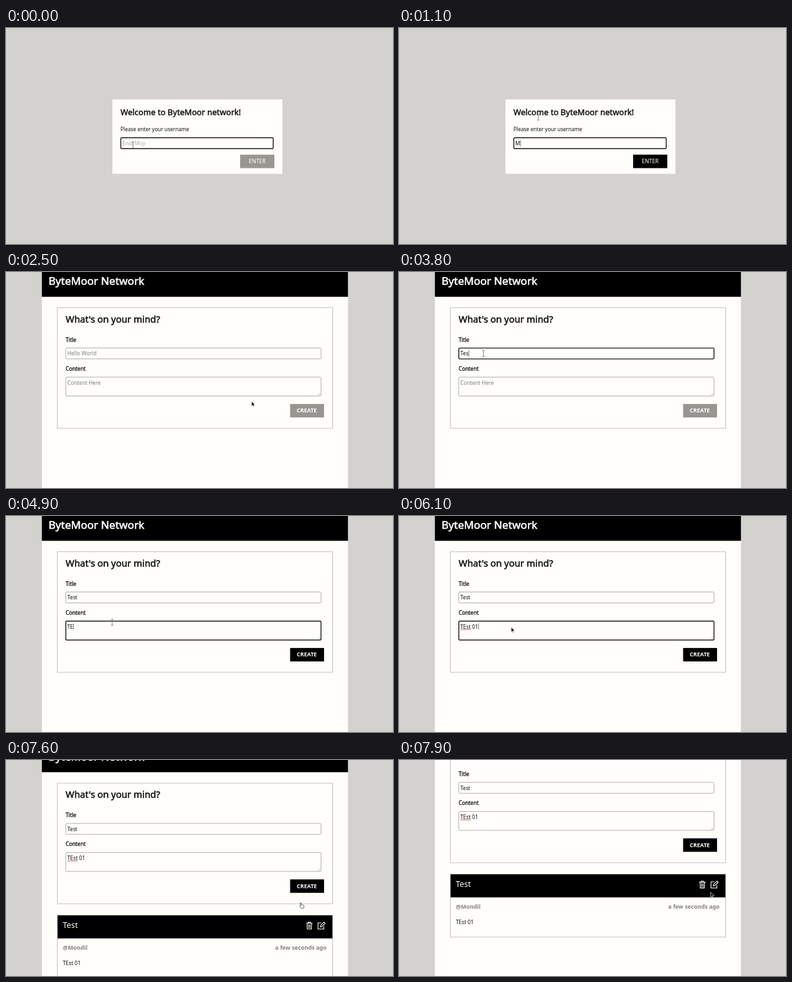
Write an HTML page that moves like this. It is 600 px wide and 337 px high and loops after 8 s.

```html
<!DOCTYPE html>
<html lang="en">
<head>
<meta charset="utf-8">
<title>ByteMoor Network</title>
<style>
html, body { margin: 0; width: 100%; height: 100%; overflow: hidden; background: #d4d2ce; }
svg { display: block; width: 600px; height: 337px; }
text { font-family: "Noto Sans", "Open Sans", sans-serif; font-size: 8.25px; white-space: pre; color: #111; fill: currentColor; }
.m { stroke: currentColor; stroke-width: .035em; }
.hint { color: #7d7c7a; }
.faint { color: #adacaa; }
.white { color: #fff; }
.meta { font-size: 8.8px; font-weight: 600; color: #85837f; }
.paper { fill: #fffefa; }
.frame { fill: none; stroke: #c4c3bf; }
.field { fill: #fffefc; stroke: #b0afad; }
.focus { stroke: #1c1c1c; stroke-width: 1.4; }
.icon { fill: none; stroke: #fff; stroke-width: 1.1; stroke-linejoin: round; stroke-linecap: round; }
</style>
</head>
<body>
<svg viewBox="0 0 600 337">
  <g id="login">
    <rect class="paper" x="165" y="111.5" width="263.5" height="116"/>
    <text class="m" x="177.5" y="135.5" style="font-size:12.6px">Welcome to ByteMoor network!</text>
    <text x="177.5" y="161.3" style="font-size:8.05px">Please enter your username</text>
    <rect class="field focus" x="178" y="171.3" width="236.3" height="17" rx="1.5"/>
    <text id="userHint" class="faint" x="180.3" y="183.2">Enid Moy</text>
    <g id="user"></g>
    <rect id="enter" x="363" y="197.6" width="53" height="21"/>
    <text class="white" x="389.5" y="211.1" text-anchor="middle" style="font-size:8.5px">ENTER</text>
  </g>
  <g id="page">
    <rect class="paper" x="55.6" y="0" width="474.6" height="337"/>
    <g id="scroll">
      <rect x="55.6" y="-1" width="474.6" height="39.7"/>
      <text class="white m" x="66" y="20.3" style="font-size:16.7px">ByteMoor Network</text>
      <rect class="frame" x="79.5" y="55.7" width="427" height="188.2"/>
      <text class="m" x="92.5" y="78.8" style="font-size:14.4px">What's on your mind?</text>
      <text class="m" x="92.5" y="108.6">Title</text>
      <rect id="titleBox" class="field" x="92.7" y="118.6" width="395.7" height="17" rx="1.5"/>
      <text id="titleHint" class="hint" x="95" y="130.3">Hello World</text>
      <g id="title"></g>
      <text class="m" x="92.5" y="154.1">Content</text>
      <rect id="bodyBox" class="field" x="92.7" y="164" width="395.7" height="29.5" rx="1.5"/>
      <path d="M483.5 192.5l3.5-3.5M485.5 192.5l1.5-1.5" stroke="#999" stroke-width=".6"/>
      <text id="bodyHint" class="hint" x="95" y="175.7">Content Here</text>
      <g id="body"></g>
      <rect id="create" x="440.5" y="205.9" width="52.6" height="21"/>
      <text class="white" x="466.4" y="219.3" text-anchor="middle" style="font-size:8.6px;font-weight:700">CREATE</text>
      <g id="post">
        <rect class="frame" x="79.5" y="261.8" width="427" height="98"/>
        <rect x="80" y="262" width="426" height="36"/>
        <text class="white" x="88" y="281.8" style="font-size:12.4px">Test</text>
        <g class="icon">
          <path d="M465.8 274.3h9M468.4 274.3v-1.6h3.8v1.6M466.8 274.5l.4 8.8h6.2l.4-8.8M469.2 276.5v4.8M471.4 276.5v4.8"/>
          <path d="M488.5 273.6h-4.7v9.8h9v-4M487.4 280l.4-2.3 5.2-5.2 1.9 1.9-5.2 5.2z"/>
        </g>
        <text class="meta" x="88" y="315.2">@Mondil</text>
        <text class="meta" x="497" y="315.2" text-anchor="end">a few seconds ago</text>
        <text x="88" y="339.6">TEst 01</text>
      </g>
    </g>
  </g>
  <g id="pointer">
    <path id="beam" d="M-1.7-4.7h3.4M0-4.7v9.4M-1.7 4.7h3.4" fill="none" stroke="#777" stroke-width=".9"/>
    <path id="arrow" d="M0 0v7.6l1.8-1.6 1.2 2.8 1.2-.5-1.2-2.7h2.5z" fill="#111" stroke="#fff" stroke-width=".6"/>
    <path id="hand" d="M-.4.6q.7-1 1.3 0v3l3.6.7q1 .3.8 1.4l-.6 3.2h-4.3l-2-2.9q-.2-1 .8-.8l.4.4z" fill="#fff" stroke="#333" stroke-width=".7"/>
  </g>
</svg>
<script>
const NS = "http://www.w3.org/2000/svg", LOOP = 8000, BLINK = 350;
const $ = id => document.getElementById(id);
const show = (id, on) => $(id).setAttribute("display", on ? "inline" : "none");
const clamp = p => Math.min(1, Math.max(0, p));
const smooth = p => p * p * (3 - 2 * p);
const cubic = p => p < 0.5 ? 4 * p ** 3 : 1 - 4 * (1 - p) ** 3;

// Each burst of typing: first key, last key, number of keys
const fields = {
  user: { x: 180.3, y: 183.2, value: "Mondil", focus: [200, 2500], bursts: [[900, 900, 1], [1400, 1700, 5]] },
  title: { x: 95, y: 130.3, value: "Test", focus: [2800, 4200], bursts: [[3500, 3900, 4]] },
  body: { x: 95, y: 175.7, value: "TEst 01", focus: [4200, 7100], bursts: [[4700, 5100, 4], [5600, 5800, 3]] }
};

function add(parent, tag, attrs) {
  const el = document.createElementNS(NS, tag);
  for (const k in attrs) el.setAttribute(k, attrs[k]);
  return parent.appendChild(el);
}

for (const id in fields) {
  const f = fields[id], [word] = f.value.split(" ");
  f.keys = f.bursts.flatMap(([a, b, n]) =>
    Array.from({ length: n }, (_, i) => a + (b - a) * i / Math.max(1, n - 1)));
  f.text = add($(id), "text", { x: f.x, y: f.y });
  f.bar = add($(id), "rect", { y: f.y - 8, width: 0.7, height: 9.6, fill: "#444" });
  f.line = add($(id), "path", { stroke: "#d0302c", "stroke-width": 0.7 });
  f.word = word.length;
  f.misspelt = word !== "Test";
}

const focused = (f, t) => t >= f.focus[0] && t < f.focus[1];

function drawField(id, t) {
  const f = fields[id], hit = f.keys.filter(k => k <= t), n = hit.length;
  f.text.textContent = f.value.slice(0, n);
  show(id + "Hint", !n);
  const since = t - Math.max(f.focus[0], ...hit);
  const lit = focused(f, t) && Math.floor(since / BLINK) % 2 === 0;
  f.bar.setAttribute("x", f.x + (n ? f.text.getComputedTextLength() + 0.2 : 0));
  f.bar.setAttribute("opacity", +lit);
  // The spelling mark appears once the word is finished
  const marked = f.misspelt && (n > f.word || n === f.value.length);
  f.line.setAttribute("d", marked ? `M${f.x} ${f.y + 1.5}h${f.text.getSubStringLength(0, f.word)}` : "");
}

function drawButton(id, t, start) {
  const p = clamp((t - start + 60) / 200);
  $(id).setAttribute("fill", `rgb(${[153, 150, 146].map(c => Math.round(c * (1 - p)))})`);
}

// Pointer moves: start, end, x, y, shape on arrival, downward bow
const moves = [
  [0, 0, 197, 182.6, "beam"],
  [100, 300, 216, 139, "beam"],
  [2000, 2400, 398.3, 206.8, "hand"],
  [2400, 2800, 118, 127, "beam"],
  [2800, 2900, 96, 24, "arrow"],
  [2900, 3200, 131, 127, "beam"],
  [4000, 4300, 164.6, 165.8, "beam"],
  [6000, 6500, 457.3, 219, "hand", 60],
  [7100, 7200, 456.8, 222.3, "hand"],
  [7700, 7900, 483, 206.3, "arrow"]
];

function drawPointer(t) {
  const i = moves.findLastIndex(m => m[0] <= t);
  const [a, b, x, y, shape, bow = 0] = moves[i], [, , x0, y0] = moves[Math.max(0, i - 1)];
  const p = b > a ? cubic(clamp((t - a) / (b - a))) : 1;
  const px = x0 + (x - x0) * p, py = y0 + (y - y0) * p + bow * Math.sin(Math.PI * p);
  $("pointer").setAttribute("transform", `translate(${px} ${py})`);
  const now = t >= b ? shape : t > a ? "arrow" : moves[i - 1][4];
  for (const s of ["beam", "arrow", "hand"]) show(s, s === now);
}

function draw(t) {
  show("login", t < 2500);
  show("page", t >= 2500);
  show("post", t >= 7200);
  for (const id in fields) drawField(id, t);
  for (const id of ["title", "body"]) $(id + "Box").classList.toggle("focus", focused(fields[id], t));
  drawButton("enter", t, fields.user.keys[0]);
  drawButton("create", t, fields.body.keys[0]);
  $("scroll").setAttribute("transform", `translate(0 ${-84.6 * smooth(clamp((t - 7450) / 480))})`);
  drawPointer(t);
}

function tick() {
  draw(Math.floor(performance.now() % LOOP / 100) * 100);
  requestAnimationFrame(tick);
}
tick();
</script>
</body>
</html>
```
